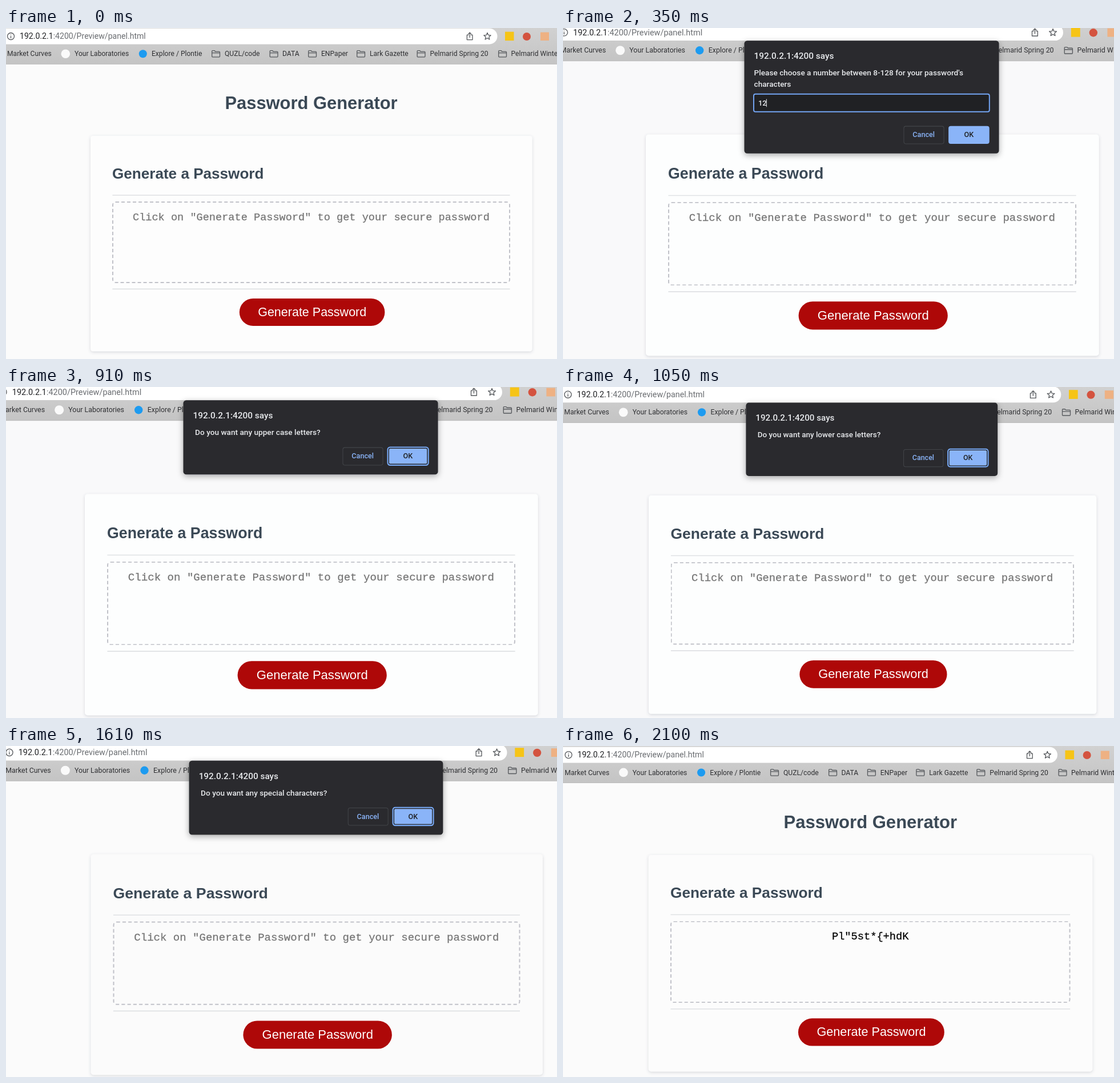
An HTML page for the animation above (2.45 s loop, 965x580 px).

```html
<!DOCTYPE html>
<html lang="en">
<head>
<meta charset="utf-8">
<title>Password Generator</title>
<style>
  html, body { margin: 0; width: 100%; height: 100%; overflow: hidden; }
  #stage { position: relative; width: 100%; height: 100%; overflow: hidden; contain: strict; }
  #view { position: absolute; left: 0; top: 0; width: 965px; height: 580px; transform-origin: 0 0; }
  svg { position: absolute; left: 0; top: 0; overflow: visible; }
  #field {
    position: absolute; left: 186.4px; top: 303.6px; width: 696.2px; height: 143px;
    box-sizing: border-box; border: 2px dashed #c1c2c9; border-radius: 6px;
  }
  text { white-space: pre; }
  .ui { font-family: Roboto, sans-serif; }
  .mid { text-anchor: middle; }
  .page { font-family: "Liberation Sans", Arial, sans-serif; }
  .head { font-weight: 700; fill: #3b4956; }
  .mono { font: 18.6px "Liberation Mono", monospace; stroke-width: .25; }
  .marks { font-size: 12.1px; fill: #2f3033; }
  .line { fill: none; stroke: #56595d; stroke-width: 1.3; stroke-linejoin: round; stroke-linecap: round; }
  .msg { font-size: 13.3px; font-weight: 500; fill: #e8eaed; }
  .btn { font-size: 12.3px; font-weight: 500; }
</style>
</head>
<body>
<div id="stage">
<div id="view">
  <svg width="965" height="580">
    <defs>
      <linearGradient id="chrome" x1="0" y1="0" x2="0" y2="1">
        <stop offset="0" stop-color="#d3d3d3"/>
        <stop offset="1" stop-color="#c4c4c4"/>
      </linearGradient>
      <filter id="soft" x="-5%" y="-5%" width="110%" height="112%">
        <feDropShadow dx="0" dy="1.5" stdDeviation="2.6" flood-color="#4a5568" flood-opacity=".22"/>
      </filter>
      <filter id="deep" x="-10%" y="-15%" width="120%" height="140%">
        <feDropShadow dx="0" dy="3" stdDeviation="5" flood-opacity=".34"/>
      </filter>
      <g id="folder" class="line">
        <path d="M.7 10.6V1.9Q.7.7 1.9.7H5.2L6.7 2.3H13.3Q14.5 2.3 14.5 3.5V10.6Q14.5 11.8 13.3 11.8H1.9Q.7 11.8.7 10.6ZM.9 4.7H14.3"/>
      </g>
    </defs>

    <!-- browser bars -->
    <rect x="-20" y="-10" width="1020" height="73.5" fill="url(#chrome)"/>
    <rect x="-20" y="62.8" width="1020" height=".8" fill="#b9b9b9"/>
    <rect x="-40" y=".8" width="900.5" height="27.6" rx="13.8" fill="#fff"/>
    <g class="line">
      <circle cx="8.5" cy="14.5" r="6"/>
      <path d="M8.5 14.2V17.4M8.5 11.6V11.7"/>
      <path d="M809.8 12.2H807.4V20.6H817V12.2H814.6M812.2 16.6V8.2M809.6 10.6L812.2 8L814.8 10.6"/>
      <path id="star"/>
    </g>
    <text class="ui" x="24" y="19.2" font-size="14.1" fill="#202124">192.0.2.1<tspan fill="#6a6d71">:4200/Preview/panel.html</tspan></text>
    <rect x="874" y="6.6" width="15.5" height="15.5" fill="#f6c416"/>
    <circle cx="912" cy="15" r="7" fill="#d4533f"/>
    <rect x="936" y="7.5" width="15" height="14.5" fill="#eeb183"/>
    <circle cx="104.3" cy="45.2" r="7.8" fill="#fafafa"/>
    <circle cx="239.8" cy="45.2" r="7" fill="#1d9bf0"/>
    <g id="marks" class="ui marks"></g>

    <!-- page -->
    <text class="page head mid" x="534.5" y="142" font-size="30.9">Password Generator</text>
    <rect id="card" x="148" y="189" width="773.6" height="377.6" rx="4.5" filter="url(#soft)"/>
    <text class="page head" x="186" y="264" font-size="26.1">Generate a Password</text>
    <path d="M186.4 293H882.6M186.4 457.4H882.6" stroke="#dfe1e4" stroke-width="1.6"/>
    <text id="content" class="mono mid" x="534.4" y="336.6"></text>
    <rect x="408.8" y="474" width="254.6" height="48" rx="24" fill="#ae0808"/>
    <text class="page mid" x="536.2" y="504.8" font-size="21.5" fill="#fff">Generate Password</text>

    <!-- dialog -->
    <g id="dialog" class="ui">
      <rect id="panel" x="316.1" y="28.6" width="434.8" rx="5" fill="#292a2d" filter="url(#deep)"/>
      <text x="332.8" y="60" font-size="15" font-weight="500" fill="#e8eaed">192.0.2.1:4200 says</text>
      <text id="line1" class="msg" y="88"></text>
      <g id="prompt">
        <text class="msg" x="332.7" y="107.4">characters</text>
        <rect x="332.2" y="119.8" width="402.4" height="30.2" rx="3" fill="#202124" stroke="#73a5f4" stroke-width="1.9"/>
        <text x="340" y="139.6" font-size="12.6" font-weight="500" fill="#e8eaed">12</text>
        <path d="M354 128.2V141.6" stroke="#e8eaed"/>
      </g>
      <g id="buttons">
        <rect x="588.5" y="109.4" width="68.4" height="30" rx="3.5" fill="none" stroke="#424549"/>
        <text class="btn mid" x="622.4" y="128.2" fill="#8ab4f8">Cancel</text>
        <rect x="664.7" y="109" width="69.8" height="30.6" rx="4" fill="#8ab4f8"/>
        <g id="ring" fill="none">
          <rect x="665.1" y="108.7" width="69.4" height="30.7" rx="4" stroke="#77aaf8" stroke-width="2"/>
          <rect x="666.8" y="110.4" width="66" height="27.3" rx="2.5" stroke="#292a2d" stroke-width="1.4"/>
        </g>
        <text class="btn mid" x="699.6" y="128.2" fill="#202124">OK</text>
      </g>
    </g>
  </svg>
  <div id="field"></div>
</div>
</div>
<script>
const $ = id => document.getElementById(id);
const STEP = 350;
const HINT = 'Click on "Generate Password" to get your secure password';
const ask = what => `Do you want any ${what}?`;

// Each step: camera (scale, x, y), page and card colours, dialog question.
const steps = [
  { cam: [1, 0, 0], page: '#fbfbfb', card: '#fdfdfd' },
  { cam: [1.0259, -6.8, -7.1], page: '#f9f9fa', card: '#fdfefe',
    question: "Please choose a number between 8-128 for your password's", prompt: true },
  { cam: [1.0259, -13.8, -6.1], page: '#f9f9fa', card: '#fdfefe', question: ask('upper case letters') },
  { cam: [1.0137, 0, -1.5], page: '#f9f9fa', card: '#fdfefe', question: ask('lower case letters') },
  { cam: [1.023, -2.8, -3.5], page: '#fbfbfb', card: '#fbfbfb', question: ask('special characters') },
  { cam: [1.0158, -10.4, 1.9], page: '#fafafa', card: '#fbfbfb', question: ask('numbers') },
  { cam: [1.005, 1.1, 1], page: '#fbfbfb', card: '#fcfcfc', password: 'Pl"5st*{+hdK' }
];

// Bookmark label, text x, optional folder x.
const bookmarks = [
  ['Market Curves', 2], ['Your Laboratories', 120], ['Explore / Plontie', 255],
  ['QUZL/code', 383, 360], ['DATA', 484, 461.5], ['ENPaper', 552, 529],
  ['Lark Gazette', 637, 614], ['Pelmarid Spring 20', 742.5, 719.5], ['Pelmarid Winter', 884.5, 862]
];
$('marks').innerHTML = bookmarks.map(([label, x, folder]) =>
  `<text x="${x}" y="49.3">${label}</text>` +
  (folder ? `<use href="#folder" x="${folder}" y="39"/>` : '')).join('');

const starPoints = Array.from({ length: 10 }, (_, i) => {
  const r = i % 2 ? 2.9 : 6.5, a = i * Math.PI / 5;
  return [843 + r * Math.sin(a), 14.8 - r * Math.cos(a)].map(v => v.toFixed(2));
});
$('star').setAttribute('d', `M${starPoints.join('L')}Z`);

const show = (id, on) => { $(id).style.display = on ? '' : 'none'; };

function render({ cam: [scale, x, y], page, card, question, prompt, password }) {
  const ink = password ? '#000' : '#757575';
  $('view').style.transform = `translate(${x}px, ${y}px) scale(${scale})`;
  $('stage').style.background = page;
  $('card').setAttribute('fill', card);
  $('content').textContent = password || HINT;
  $('content').setAttribute('fill', ink);
  $('content').setAttribute('stroke', ink);
  show('dialog', question);
  show('prompt', prompt);
  show('ring', !prompt);
  $('line1').textContent = question || '';
  $('line1').setAttribute('x', prompt ? 332.7 : 336.2);
  $('panel').setAttribute('height', prompt ? 192.6 : 126.8);
  $('buttons').setAttribute('transform', `translate(0 ${prompt ? 65.3 : 0})`);
}

const start = performance.now();
let current = -1;
function tick() {
  const index = Math.floor((performance.now() - start) / STEP) % steps.length;
  if (index !== current) render(steps[current = index]);
  requestAnimationFrame(tick);
}
tick();
</script>
</body>
</html>
```
